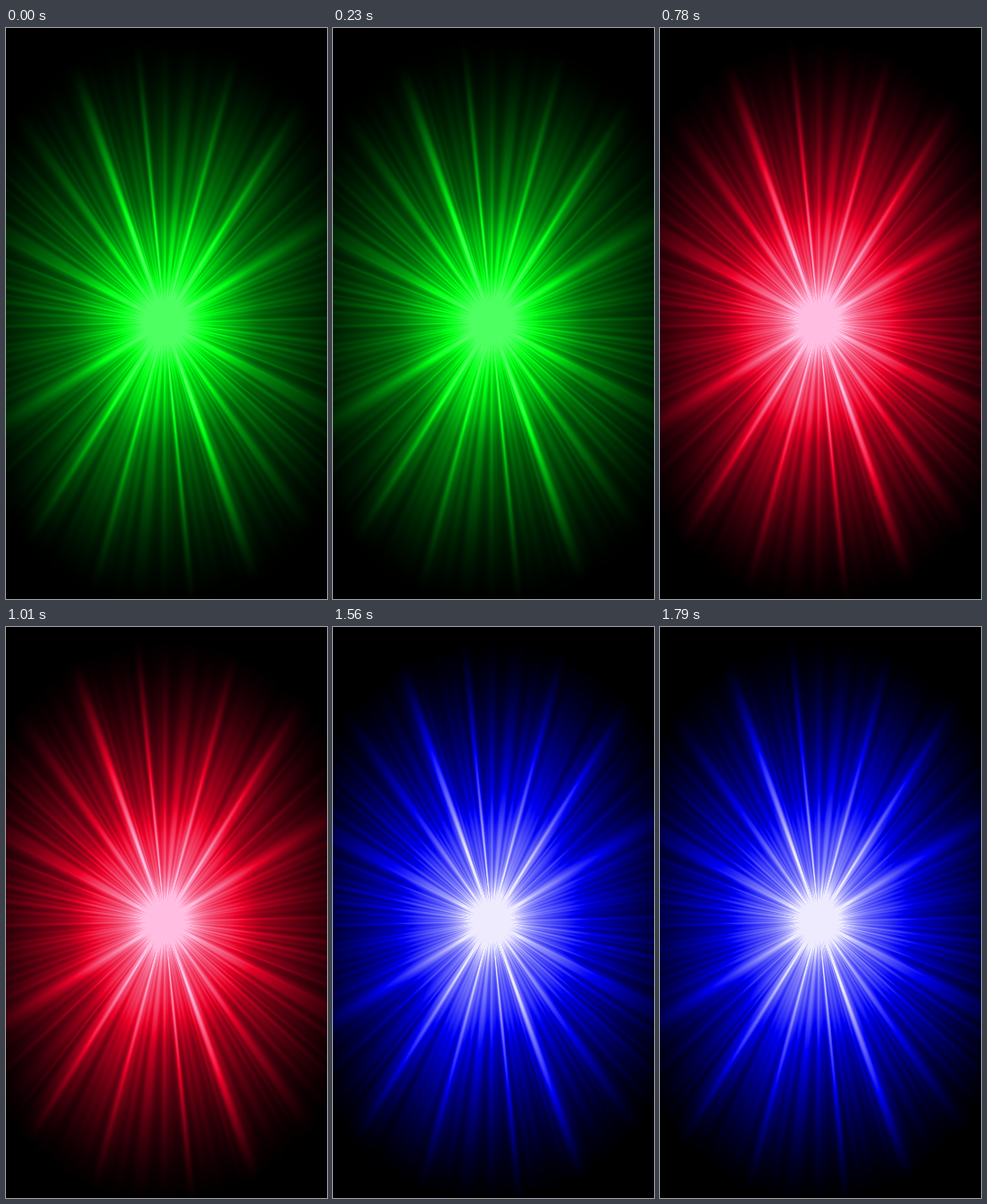
An HTML page with a canvas that plays this animation: 360x640 px, repeating every 1950 ms.

```html
<!DOCTYPE html>
<html lang="en">
<head>
<meta charset="utf-8">
<title>Starburst</title>
<style>
html, body { margin: 0; width: 100%; height: 100%; overflow: hidden; background: #000; }
canvas { display: block; width: 100%; height: 100%; }
</style>
</head>
<body>
<canvas id="stage" width="360" height="640"></canvas>
<script>
const W = 360, H = 640, CX = 178, CY = 330, HOLD = 390;
const REACH_X = 250, REACH_Y = 320;
const STEPS = 3600; // angular samples over half a turn

// Brightest rays; each runs both ways from the centre, degrees clockwise from up.
const MAIN_RAYS = [
  { angle: -19.3, strength: .8, width: 1.3 },
  { angle: -5.7, strength: .4, width: .7 },
  { angle: -34.5, strength: .35, width: 1 },
  { angle: -61, strength: .3, width: 2.5 },
  { angle: 14.7, strength: .4, width: .9 },
  { angle: 32, strength: .55, width: 1.8 },
  { angle: 58, strength: .3, width: 3 }
];

// Each burst rises from black to its pure colour at the knee, then pales to its core.
const BURSTS = [
  { pure: [0, 255, 20], core: [78, 255, 98], knee: .65 },
  { pure: [245, 100, 8], core: [255, 225, 115], knee: .5 },
  { pure: [235, 0, 40], core: [255, 190, 225], knee: .4 },
  { pure: [235, 0, 190], core: [255, 178, 255], knee: .45 },
  { pure: [0, 0, 245], core: [238, 235, 255], knee: .33 }
];

function seeded(seed) {
  return () => (seed = (seed * 16807) % 2147483647) / 2147483647;
}

function smooth(from, to, x) {
  const t = Math.min(1, Math.max(0, (x - from) / (to - from)));
  return t * t * (3 - 2 * t);
}

function makeProfile() {
  const random = seeded(4127);
  const profile = new Float32Array(STEPS);
  const perDegree = STEPS / 180;
  const addRay = ({ angle, strength, width }) => {
    const mid = Math.round(angle * perDegree);
    const span = Math.ceil(width * 3 * perDegree);
    for (let i = -span; i <= span; i++) {
      const d = i / perDegree / width;
      profile[(mid + i + 2 * STEPS) % STEPS] += strength * Math.exp(-d * d);
    }
  };
  MAIN_RAYS.forEach(addRay);
  for (let angle = 0; angle < 180; angle += 3) {
    addRay({
      angle: angle + random() * 2,
      strength: .06 + random() * .22,
      width: .6 + random()
    });
  }
  return profile;
}

function makeLight() {
  const profile = makeProfile();
  const light = new Float32Array(W * H);
  for (let y = 0, i = 0; y < H; y++) {
    for (let x = 0; x < W; x++, i++) {
      const dx = x + .5 - CX, dy = y + .5 - CY;
      const reach = Math.hypot(dx / REACH_X, dy / REACH_Y);
      const turn = Math.atan2(dx, -dy) / Math.PI + 2;
      const ray = profile[Math.floor(turn * STEPS) % STEPS];
      const fall = Math.max(0, 1 - reach);
      const core = .55 * Math.exp(-(dx * dx + dy * dy) / 1300);
      const halo = .55 * fall ** 1.6 + .1 * smooth(.46, .25, reach);
      light[i] = Math.min(1, core + halo + ray * fall ** 1.2);
    }
  }
  return light;
}

function colourAt({ pure, core, knee }, level) {
  if (level < knee) return pure.map(c => c * level / knee);
  const t = ((level - knee) / (1 - knee)) ** .85;
  return pure.map((c, i) => c + (core[i] - c) * t);
}

function paint(light, burst) {
  const image = new ImageData(W, H);
  const ramp = Array.from({ length: 512 }, (_, i) => colourAt(burst, i / 511));
  light.forEach((level, i) => {
    image.data.set(ramp[Math.round(level * 511)], i * 4);
    image.data[i * 4 + 3] = 255;
  });
  return image;
}

const ctx = document.getElementById("stage").getContext("2d");
const light = makeLight();
const images = BURSTS.map(burst => paint(light, burst));
const start = performance.now();
let shown = -1;

function draw() {
  const index = Math.floor((performance.now() - start) / HOLD) % images.length;
  if (index !== shown) ctx.putImageData(images[shown = index], 0, 0);
  requestAnimationFrame(draw);
}
draw();
</script>
</body>
</html>
```
